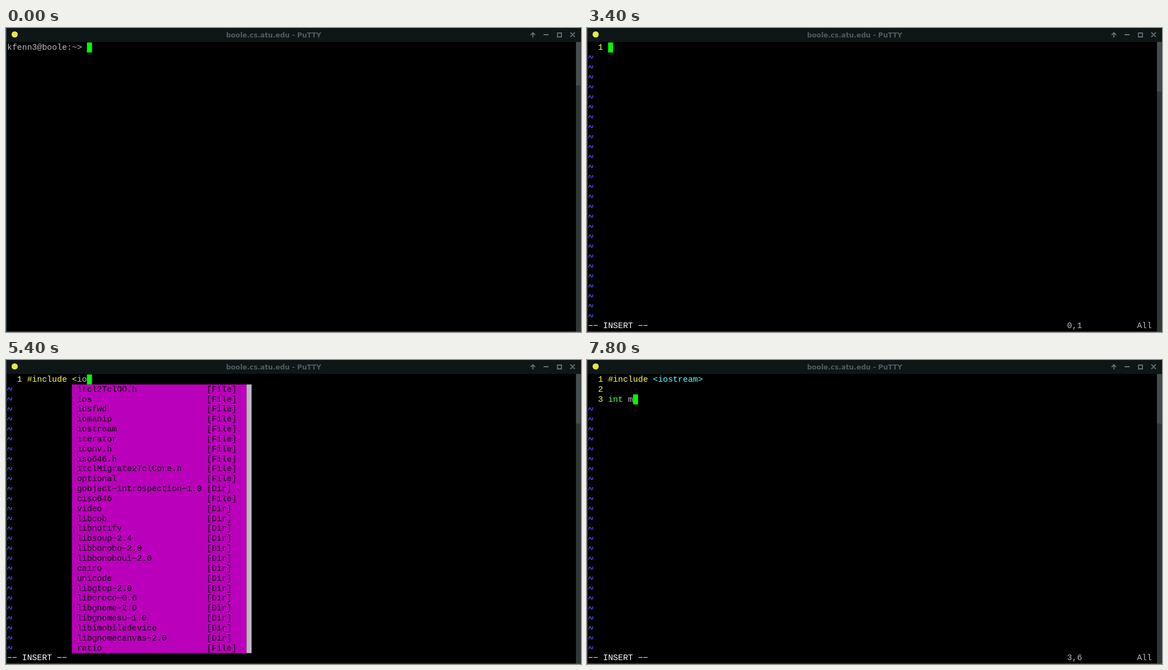
Animation, 1028 px wide and 545 px high, one loop 8 s. Source, as an HTML page with a canvas:

```html
<!DOCTYPE html>
<html>
<head>
<meta charset="utf-8">
<style>
html, body { margin: 0; height: 100%; overflow: hidden; background: #000; }
canvas { display: block; }
</style>
</head>
<body>
<canvas id="stage" width="1028" height="545"></canvas>
<script>
const ctx = document.getElementById('stage').getContext('2d');
const LOOP = 8000;
const CELL_W = 9, CELL_H = 18, SCALE = 0.9911, BASE = 13, ROWS = 29;
const GREY = '#bbbbbb', WHITE = '#ffffff', YELLOW = '#ffff55', BLUE = '#5555ff',
      CYAN = '#55ffff', GREEN = '#55ff55', CURSOR = '#00ff00', PURPLE = '#bb00bb';
const PROMPT = 'kfenn3@boole:~> ';
const WAVE = new Path2D('M1.3 11C1.3 4.6 3.8 5.8 4.8 8.3S8.4 12 8.4 5.6');
const BUTTONS = new Path2D(
  'M942 17V9M938 12.5L942 8.5L946 12.5M961 12H970M986 9H993V16H986ZM1009 8L1017 16M1017 8L1009 16');

// Menu entries; a trailing slash marks a directory.
const ALL_HEADERS = `32/ a.out.h aalogparse/ acl/ adxintrin.h af_vfs.h aio.h algorithm
  aliases.h alloca.h alsa/ ammintrin.h ansidecl.h any ao/ apache2/ apache2-event/
  apache2-prefork/ apache2-worker/ apr-1/ ar.h arch-arm/ arch-arm64/ arch-ia64/
  arch-m68k/ arch-mips/ arch-parisc/`.split(/\s+/);
const IO_HEADERS = `itcl2TclOO.h ios iosfwd iomanip iostream iterator iconv.h iso646.h
  itclMigrate2TclCore.h optional gobject-introspection-1.0/ ciso646 video/ libcob/
  libnotify/ libsoup-2.4/ libbonobo-2.0/ libbonoboui-2.0/ cairo/ unicode/ libgtop-2.0/
  libcroco-0.6/ libgnome-2.0/ libgnomesu-1.0/ libimobiledevice/ libgnomecanvas-2.0/
  ratio`.split(/\s+/);
const IOST_HEADERS = ['iostream', 'gobject-introspection-1.0/', 'libpostproc/'];
const IOSTREAM = ['iostream'];

function rect(x, y, w, h, color) {
  ctx.fillStyle = color;
  ctx.fillRect(x, y, w, h);
}

function cells(col, row, w, h, color) {
  rect(col * CELL_W, row * CELL_H, w * CELL_W, h * CELL_H, color);
}

// The terminal face has wide hyphens, so they are set as minus signs.
function put(text, col, row, color) {
  ctx.fillStyle = color;
  ctx.fillText(text.replaceAll('-', '\u2212'), col * CELL_W, row * CELL_H + BASE);
}

// Steep tilde that marks an unused row.
function wave(row) {
  ctx.save();
  ctx.translate(0, row * CELL_H);
  ctx.strokeStyle = BLUE;
  ctx.lineWidth = 1.4;
  ctx.stroke(WAVE);
  ctx.restore();
}

// Writes [text, color] runs one after another; returns the next column.
function runs(list, col, row) {
  for (const [text, color] of list) {
    put(text, col, row, color);
    col += text.length;
  }
  return col;
}

function menu(items) {
  const width = Math.max(...items.map(s => s.replace('/', '').length));
  const kindCol = 15 + width;
  const scrolls = items.length > 26;
  const end = kindCol + (scrolls ? 8 : 7);
  cells(13, 1, end - 13, items.length, PURPLE);
  if (scrolls) cells(end, 1, 1, items.length, GREY);
  items.forEach((item, i) => {
    put(item.replace('/', ''), 14, i + 1, '#000');
    put(item.endsWith('/') ? '[Dir]' : '[File]', kindCol, i + 1, '#000');
  });
}

const shell = (typed, entered) => ({
  thumb: 78,
  draw() {
    put(PROMPT + typed, 0, 0, GREY);
    cells(entered ? 0 : PROMPT.length + typed.length, entered ? 1 : 0, 1, 1, CURSOR);
  }
});

const vim = (lines, ruler, items, message) => ({
  thumb: 89,
  draw() {
    let end;
    lines.forEach((line, row) => {
      put(String(row + 1), 2, row, YELLOW);
      end = runs(line, 4, row);
    });
    for (let row = lines.length; row < ROWS - 1; row++) wave(row);
    cells(end, lines.length - 1, 1, 1, CURSOR);
    if (items) menu(items);
    put(message || '-- INSERT --', 0, ROWS - 1, message ? GREY : WHITE);
    if (ruler) {
      put(ruler, 96, ROWS - 1, GREY);
      put('All', 110, ROWS - 1, GREY);
    }
  }
});

const plain = text => vim([[[text, GREY]]], '1,' + (text.length + 1));
const picking = (text, items) => vim([[['#include <', YELLOW], [text, GREY]]], '', items);
const include = [['#include ', YELLOW], ['<iostream>', CYAN]];
const body = (line, ruler) => vim([include, [], line], ruler);

const steps = [
  [0, shell('')],
  [900, shell('v')],
  [1100, shell('vim')],
  [1400, shell('vim ')],
  [1600, shell('vim m')],
  [1700, shell('vim mai')],
  [1900, shell('vim main')],
  [2100, shell('vim main.c')],
  [2300, shell('vim main.cpp')],
  [2500, shell('vim main.cpp', true)],
  [2700, vim([[]], '0,0-1', null, '"main.cpp" [New File]')],
  [3400, vim([[]], '0,1')],
  [3800, plain('#')],
  [3900, plain('#in')],
  [4200, plain('#inc')],
  [4400, plain('#inclu')],
  [4600, plain('#include')],
  [4900, picking('', ALL_HEADERS)],
  [5200, picking('i', IO_HEADERS)],
  [5400, picking('io', IO_HEADERS)],
  [5600, picking('iost', IOST_HEADERS)],
  [5900, picking('iostr', IOSTREAM)],
  [6100, picking('iostream', IOSTREAM)],
  [6400, vim([include], '1,20')],
  [6900, vim([include, []], '2,1')],
  [7100, body([], '3,1')],
  [7400, body([['i', GREY]], '3,2')],
  [7600, body([['int', GREEN]], '')],
  [7800, body([['int ', GREEN], ['m', GREY]], '3,6')]
];

function frame(thumb) {
  rect(0, 0, 1028, 545, '#000');
  rect(0, 0, 1028, 25, '#0e1616');
  rect(0, 0, 1, 545, '#3c5c5e');
  rect(0, 544, 1028, 1, '#3c5c5e');
  rect(1019, 25, 9, 519, '#303938');
  rect(1019, 25, 8, thumb, '#454e4d');

  ctx.fillStyle = '#e6e64a';
  ctx.beginPath();
  ctx.arc(15.5, 11.5, 5.5, 0, 7);
  ctx.fill();

  ctx.font = 'bold 12.1px "DejaVu Sans", sans-serif';
  ctx.textAlign = 'center';
  ctx.fillStyle = '#525c5c';
  ctx.fillText('boole.cs.atu.edu - PuTTY', 478.5, 17);

  ctx.strokeStyle = '#687373';
  ctx.lineWidth = 1.8;
  ctx.stroke(BUTTONS);
}

function render({ thumb, draw }) {
  frame(thumb);
  ctx.save();
  ctx.translate(2, 26);
  ctx.scale(SCALE, SCALE);
  ctx.font = '15px "Liberation Mono", monospace';
  ctx.textAlign = 'left';
  draw();
  ctx.restore();
}

let shown;
function tick() {
  const t = performance.now() % LOOP;
  const step = steps.findLast(([start]) => start <= t);
  if (step !== shown) render((shown = step)[1]);
  requestAnimationFrame(tick);
}
tick();
</script>
</body>
</html>
```
